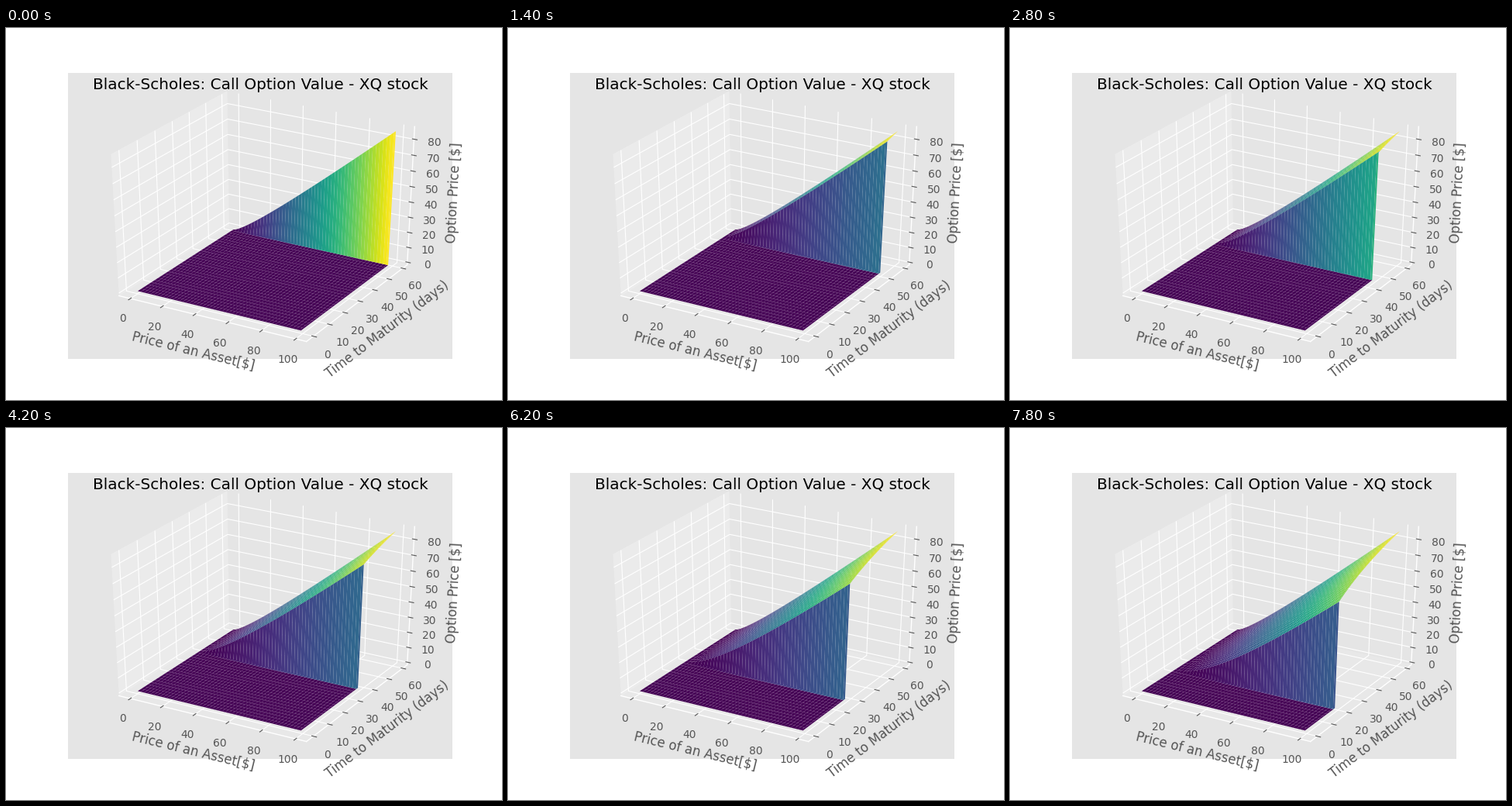
A matplotlib script that plays this animation: 640x480 px, repeating every 8 s.

```python
import math

import matplotlib.pyplot as plt
import numpy as np
from matplotlib.animation import FuncAnimation

STRIKE, RATE, VOL = 57, 0.01, 0.3
FRAMES, INTERVAL = 40, 200

erf = np.vectorize(math.erf)


def norm_cdf(x):
    return 0.5 * (1 + erf(x / math.sqrt(2)))


def call_price(s, t):
    """Black-Scholes value of a European call."""
    s = np.maximum(s, 1e-9)
    t = np.maximum(t, 1e-9)
    sd = VOL * np.sqrt(t)
    d1 = (np.log(s / STRIKE) + RATE * t) / sd + sd / 2
    return s * norm_cdf(d1) - STRIKE * np.exp(-RATE * t) * norm_cdf(d1 - sd)


def padded(lo, hi, margin):
    """Limits with a data margin plus the small gap to the box walls."""
    pad = (hi - lo) * margin
    lo, hi = lo - pad, hi + pad
    gap = (hi - lo) / 48
    return lo - gap, hi + gap


price, days = np.meshgrid(np.arange(100.0), np.arange(60.0))
value = call_price(price, days)

plt.style.use("ggplot")
fig = plt.figure(figsize=(6.4, 4.8), dpi=100)
ax = fig.add_subplot(projection="3d")

# A unit cube stretched over the full, non-square axes rectangle.
ax.apply_aspect = lambda position=None: None
ax.set_position([0.125, 0.11, 0.775, 0.77])
ax.set_box_aspect((1, 1, 1), zoom=math.sqrt(3) / 1.8294640721620434)
ax.view_init(elev=30, azim=-60)

ax.set_xlim(*padded(0, price.max(), 0.05))
ax.set_ylim(*padded(0, days.max(), 0.05))
ax.set_zlim(*padded(0, value.max(), 0))
ax.set_xticks(range(0, 101, 20))
ax.set_yticks(range(0, 61, 10))
ax.set_zticks(range(0, 81, 10))

# A fixed y turns off automatic placement, so the title stays inside the axes.
ax.set_title("Black-Scholes: Call Option Value - XQ stock", y=1)
ax.title.set_y(0.92)
ax.set_xlabel("Price of an Asset[$]")
ax.set_ylabel("Time to Maturity (days)")
ax.set_zlabel("Option Price [$]")

surfaces = []


def draw(frame):
    """Reveal one more day of the surface, starting at the longest maturity."""
    while surfaces:
        surfaces.pop().remove()
    shown = np.where(days >= days.max() - frame, value, 0)
    surfaces.append(ax.plot_surface(price, days, shown, cmap="viridis"))
    return surfaces


anim = FuncAnimation(fig, draw, frames=FRAMES, interval=INTERVAL,
                     init_func=lambda: draw(0), repeat=True, repeat_delay=0)
plt.show()
```
